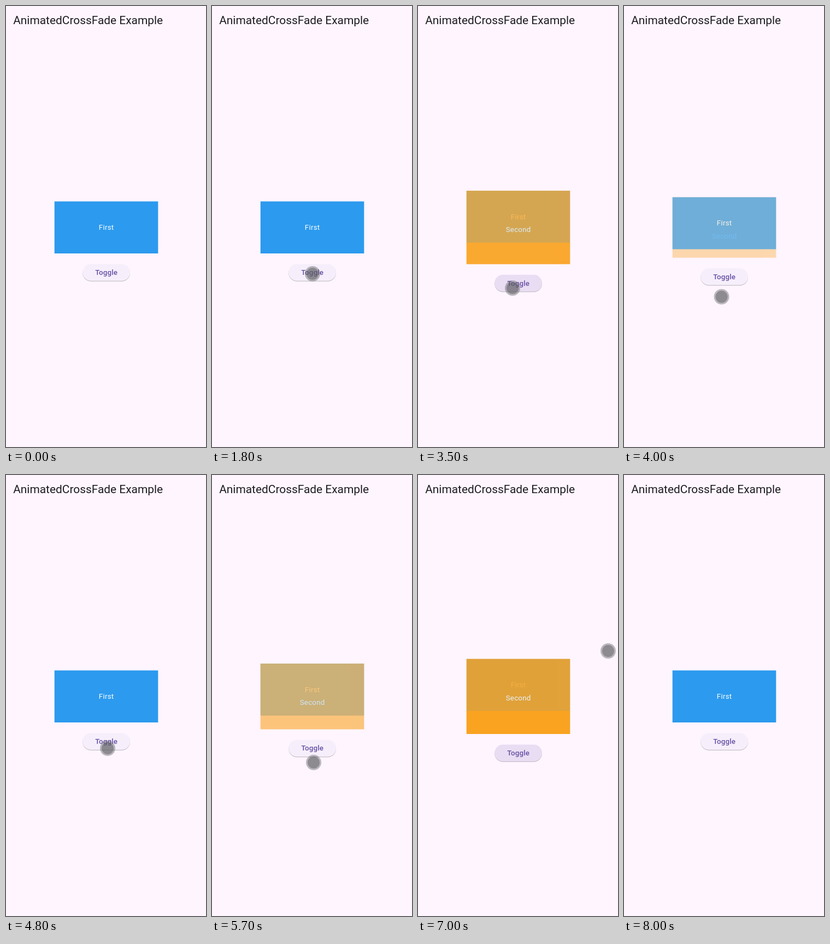
An HTML page that plays this animation: 366 px wide and 802 px high, repeating every 8100 ms.

```html
<!DOCTYPE html>
<html lang="en">
<head>
<meta charset="utf-8">
<title>Cross fade</title>
<style>
  html, body { margin: 0; width: 100%; height: 100%; overflow: hidden; background: #fef5ff; }
  svg { display: block; width: 366px; height: 802px; font: 13.3px Roboto, sans-serif; }
  .label { text-anchor: middle; letter-spacing: .24px; fill: #fff; }
  #button rect { filter: drop-shadow(0 1px .7px rgba(0, 0, 0, .26)); }
  #button text { font-weight: 450; letter-spacing: .15px; fill: #6750a4; }
  #pointer { fill: rgb(90, 90, 95); }
</style>
</head>
<body>
<svg viewBox="0 0 366 802">
  <clipPath id="clip"><rect id="window" x="88" width="191"/></clipPath>
  <text x="13.2" y="33" font-size="20.9" fill="#1d1b20">AnimatedCrossFade Example</text>
  <g id="box">
    <g id="stack" clip-path="url(#clip)">
      <g id="second">
        <rect x="88.7" width="189.6" height="142.2" fill="#f99804"/>
        <text class="label" x="183.6" y="75.6">Second</text>
      </g>
      <g id="first">
        <rect x="88.7" width="189.6" height="94.8" fill="#2c9aee"/>
        <text class="label" x="183.6" y="51.9">First</text>
      </g>
    </g>
  </g>
  <g id="button">
    <rect id="pill" x="140.2" y="469.2" width="86.8" height="30.6" rx="15.3"/>
    <text class="label" x="183.6" y="489">Toggle</text>
  </g>
  <g id="pointer">
    <circle r="14" opacity=".4"/>
    <circle r="11" opacity=".48"/>
  </g>
</svg>
<script>
const LOOP = 8100, STEP = 100, FADE = 1000, GLIDE = 600;
const TOP = 355.2, HEIGHT = 94.8;
const $ = id => document.getElementById(id);
const clamp = v => Math.min(1, Math.max(0, v));
const lerp = (a, b, k) => a + (b - a) * k;
const smooth = k => k * k * (3 - 2 * k);

// Clicks alternately show the second child and return to the first.
const clicks = [1800, 3325, 5174, 6884];

// The pointer rests at each stop, then glides to reach the next one in time.
const stops = [
  { at: 500, x: 350, y: 357 },
  { at: 1100, x: 184, y: 487 },
  { at: 2700, x: 347, y: 557 },
  { at: 3300, x: 173, y: 513 },
  { at: 4100, x: 179, y: 530 },
  { at: 4800, x: 186, y: 497 },
  { at: 5960, x: 186, y: 540 },
  { at: 6800, x: 186, y: 516 },
  { at: 7000, x: 348, y: 320 }
];

function pointerAt(time) {
  const i = stops.findIndex(s => s.at >= time);
  if (i < 0 || time < stops[0].at) return null;
  const to = stops[i], from = stops[i - 1] ?? to;
  const length = Math.min(GLIDE, to.at - from.at) || 1;
  const k = smooth(clamp(1 - (to.at - time) / length));
  return [lerp(from.x, to.x, k), lerp(from.y, to.y, k)];
}

function draw(time) {
  const n = clicks.filter(c => c <= time).length;
  const since = n ? time - clicks[n - 1] : Infinity;
  const forward = n % 2 === 1;
  const progress = clamp(since / FADE);
  const t = forward ? progress : 1 - progress;
  const grow = HEIGHT / 2 * t;

  // The incoming child lies on top.
  const top = $(forward ? 'second' : 'first');
  if ($('stack').lastElementChild !== top) $('stack').append(top);
  $('first').setAttribute('opacity', 1 - t);
  $('second').setAttribute('opacity', t);
  $('window').setAttribute('height', HEIGHT + grow);
  $('box').setAttribute('transform', `translate(0 ${TOP - grow / 2})`);

  const press = clamp(since / 100) * clamp((450 - since) / 200);
  const mix = (a, b) => Math.round(lerp(a, b, press));
  $('pill').setAttribute('fill', `rgb(${mix(246, 233)}, ${mix(239, 221)}, ${mix(251, 243)})`);
  $('button').setAttribute('transform', `translate(0 ${grow / 2})`);

  const place = pointerAt(time);
  $('pointer').setAttribute('visibility', place ? 'visible' : 'hidden');
  if (place) $('pointer').setAttribute('transform', `translate(${place})`);
}

let start;
function frame(now) {
  start ??= now;
  draw(Math.floor((now - start) % LOOP / STEP) * STEP);
  requestAnimationFrame(frame);
}
draw(0);
requestAnimationFrame(frame);
</script>
</body>
</html>
```
